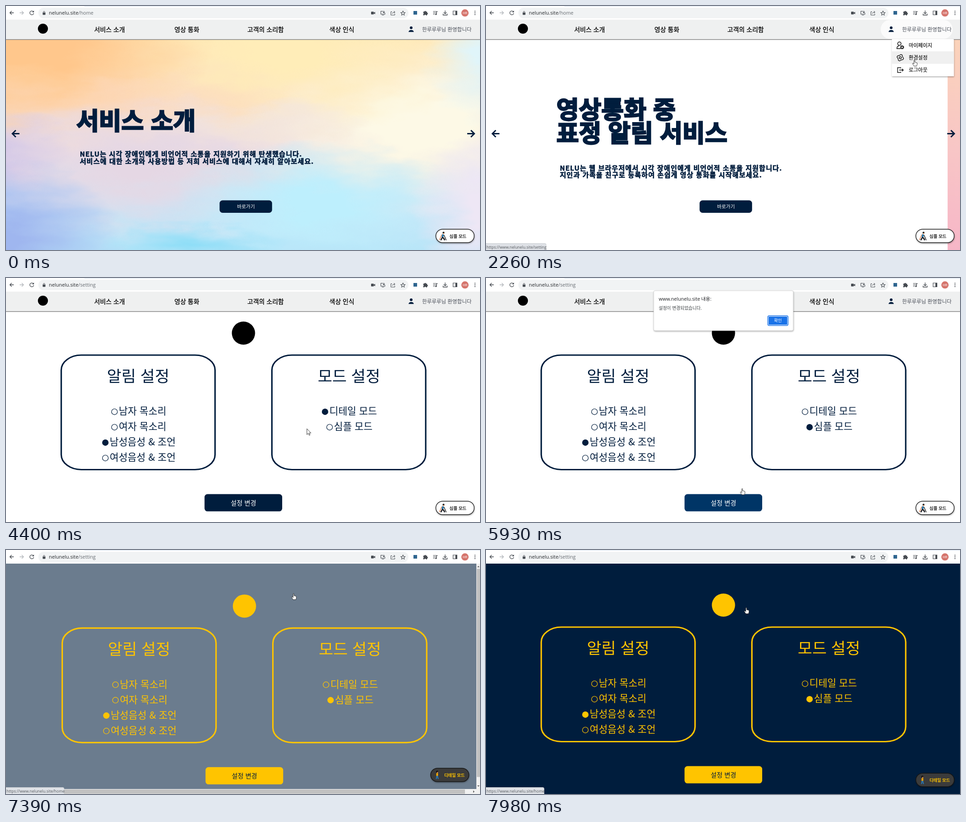
An HTML page that plays this animation: 1040 px wide and 538 px high, repeating every 8000 ms.

```html
<!DOCTYPE html>
<html lang="ko">
<head>
<meta charset="utf-8">
<title>Settings demo</title>
<style>
html, body { margin: 0; width: 100%; height: 100%; overflow: hidden; background: #fff; }
#stage { position: absolute; left: 0; top: 0; width: 1040px; height: 538px; overflow: hidden; background: #fff; }
#stage > svg { position: absolute; left: 0; top: 0; font-family: "Noto Sans CJK KR", "Noto Sans CJK", sans-serif; }
svg text { white-space: pre; }
.ui { font-family: "Open Sans", "Noto Sans", sans-serif; }
.airy { letter-spacing: 1.05px; }
.slide { position: absolute; left: 0; top: 74px; width: 1040px; height: 464px; overflow: hidden; }
.paint {
  position: absolute; inset: -50px; filter: url(#brush);
  background:
    radial-gradient(ellipse 140px 170px at 1110px 80px, #e0f5fa 20%, #e0f5fa00),
    radial-gradient(ellipse 150px 170px at 1090px 420px, #eee7f5 20%, #eee7f500),
    radial-gradient(ellipse 210px 60px at 460px 510px, #8fdef7, #8fdef700),
    radial-gradient(ellipse 330px 140px at 740px 410px, #bdeffd 20%, #bdeffd00),
    radial-gradient(ellipse 300px 60px at 410px 180px, #fcdabc60 50%, #fcdabc00 95%),
    radial-gradient(ellipse 300px 60px at 580px 235px, #f2e5de90 45%, #f2e5de00 95%),
    radial-gradient(ellipse 270px 180px at 40px 490px, #9fb6ef 15%, #9fb6ef00),
    radial-gradient(ellipse 170px 110px at 20px 300px, #d0c4e8, #d0c4e800),
    radial-gradient(ellipse 420px 150px at 340px 330px, #e5d7e4 10%, #e5d7e400),
    radial-gradient(ellipse 400px 200px at 110px 60px, #ffc78c 22%, #ffc78c00),
    radial-gradient(ellipse 420px 200px at 660px 70px, #ffedb8 15%, #ffedb800),
    radial-gradient(ellipse 430px 210px at 960px 230px, #fdf9e6 25%, #fdf9e600),
    linear-gradient(#ffe6b6 8%, #fbdcc6 32%, #eedfe2 52%, #d3e4f4 70%, #b9e5f8 90%);
}
.rose { background: linear-gradient(176deg, #fbd3ba, #f8c6c6 45%, #f6b1c8); }
</style>
</head>
<body>
<div id="stage">
  <div class="slide" id="first"><div class="paint"></div></div>
  <div class="slide rose" id="second"></div>
  <svg id="view" width="1040" height="538" viewBox="0 0 1040 538"></svg>
</div>
<script>
const LOOP = 8000, NAVY = '#001d3d', GOLD = '#ffc400';
const HOST = 'nelunelu.site';

// Text placed by its visual middle; "thick" outlines it for extra weight
function text(x, mid, size, str, o = {}) {
  const { weight = 400, fill = 'currentColor', anchor = 'start', cls = '', thick = 0, extra = '' } = o;
  return `<text class="${cls}" x="${x}" y="${(mid + size * .37).toFixed(2)}" font-size="${size}"
    font-weight="${weight}" fill="${fill}" text-anchor="${anchor}"
    ${thick ? `stroke="${fill}" stroke-width="${thick}"` : ''} ${extra}>${str}</text>`;
}
const rect = (x, y, w, h, r, fill, extra = '') =>
  `<rect x="${x}" y="${y}" width="${w}" height="${h}" rx="${r}" fill="${fill}" ${extra}/>`;
const dot = (x, y, r, fill, extra = '') =>
  `<circle cx="${x}" cy="${y}" r="${r}" fill="${fill}" ${extra}/>`;
const line = (d, color, width = 1.3, extra = '') =>
  `<path d="${d}" fill="none" stroke="${color}" stroke-width="${width}" ${extra}/>`;
const solid = (d, fill, extra = '') => `<path d="${d}" fill="${fill}" ${extra}/>`;
const group = (id, body, extra = '') => `<g id="${id}" ${extra}>${body}</g>`;

function browserBar() {
  const g = '#454a50';
  return rect(0, 0, 1040, 30, 0, '#fff') + rect(172, 0, 868, 1, 0, '#d7e3f0') +
    rect(71, 4, 812, 23, 11.5, '#f1f3f4') +
    line('M17 15H9M12.5 11L8.5 15L12.5 19', g) +
    line('M30 15H38M34.5 11L38.5 15L34.5 19', '#b4b8bc') +
    line('M60 12.5A4.3 4.3 0 1 0 60.8 16', g) + solid('M61.3 10V14H57.3Z', g) +
    rect(80.5, 14.5, 6, 5, .8, g) + line('M81.8 15V13.4A1.7 1.7 0 0 1 85.2 13.4V15', g, 1) +
    `<text class="ui" x="94" y="19.2" font-size="10.8" fill="#25282c">${HOST}<tspan id="path" fill="#676c72"></tspan></text>` +
    rect(801, 12.5, 6, 6, .8, g) + solid('M807 15L810 12.8V18.2L807 16Z', g) +
    line('M827 11.5H822.5V18H831.5V15.5M824.5 20H829.5M829 10.5V15M826.8 13L829 15.2L831.2 13', g, 1.1) +
    line('M847 12.5H844.5V20H853V17M847 17Q848 13.5 853 13.5M851 11L853.6 13.5L851 16', g, 1) +
    line('M871 11L872.4 14.2L875.8 14.5L873.2 16.8L874 20.2L871 18.4L868 20.2L868.8 16.8L866.2 14.5L869.6 14.2Z', g, 1.1) +
    rect(894, 11, 8, 8, 0, '#2f6690') +
    solid('M915.5 12.5H918A1.7 1.7 0 0 1 921.4 12.5H924V15A1.7 1.7 0 0 1 924 18.4V20.5H921.2A1.5 1.5 0 0 0 918.2 20.5H915.5V17.8A1.5 1.5 0 0 0 915.5 15Z', g) +
    line('M937 12H945M937 15H945M937 18H941M944.6 18V12.4H947', g, 1.2) + dot(943.4, 18.3, 1.6, g) +
    line('M963.5 10V17M960.3 14L963.5 17.2L966.7 14M959 17V20H968V17', g) +
    line('M981 11H989.5V19.5H981Z', g, 1.2) + rect(986, 11, 3.5, 8.5, 0, g) +
    dot(1007, 15.3, 8, '#d5746c') +
    text(1007, 15.5, 7.5, 'HR', { fill: '#fff', anchor: 'middle', cls: 'ui' }) +
    [11.5, 15.2, 18.9].map(y => dot(1029, y, 1.1, g)).join('');
}

function navBar() {
  const items = [[194, '서비스 소개'], [370, '영상 통화'], [530, '고객의 소리함'], [710, '색상 인식']];
  return rect(0, 30, 1040, 43.5, 0, '#eff0f0') + rect(0, 73.2, 1040, 1.5, 0, '#858585') +
    dot(81, 50, 11, '#000') +
    items.map(([x, s]) => text(x - .5, 51.5, 13.8, s, { weight: 500, fill: '#000', thick: .3 })).join('') +
    group('hover', rect(866, 30.5, 158, 42, 21, '#fbfbfb')) +
    dot(889, 48, 3, NAVY) + solid('M883.3 57.3C883.3 51.4 894.7 51.4 894.7 57.3Z', NAVY) +
    text(913, 51.5, 11.45, '한루루루님 환영합니다', { fill: '#4a4f59', weight: 300 });
}

function menu() {
  const k = '#111', item = { weight: 500, fill: k, thick: .2 };
  const gear = Array.from({ length: 16 }, (_, i) => {
    const r = i % 4 < 2 ? 7.3 : 5.6, a = (i + .5) * Math.PI / 8;
    return `${(909 + r * Math.cos(a)).toFixed(1)} ${(114 + r * Math.sin(a)).toFixed(1)}`;
  }).join('L');
  return rect(890.5, 73, 136, 82, 1, '#fff', 'filter="url(#soft)"') +
    rect(890.5, 100, 136, 27.5, 0, '#f0f0f0', 'id="row"') +
    dot(907, 83, 3.7, 'none', `stroke="${k}" stroke-width="1.5"`) +
    line('M910 94H901.5C901.5 90 902.5 88.3 906 88', k, 1.5) +
    dot(913, 91, 2.6, 'none', `stroke="${k}" stroke-width="1.7"`) +
    dot(913, 91, 3.8, 'none', `stroke="${k}" stroke-width="1.2" stroke-dasharray="1.5 1.48"`) +
    line(`M${gear}Z`, k, 1.4, 'stroke-linejoin="round"') + dot(909, 114, 2.4, 'none', `stroke="${k}" stroke-width="1.4"`) +
    line('M910 137.5V136H903V146.5H910V145M906.5 141.2H915.5M912.8 138.4L915.6 141.2L912.8 144', k, 1.4) +
    text(927.5, 87, 11.2, '마이페이지', item) +
    text(927.5, 114, 11.2, '환경설정', item) + text(927.5, 141, 11.2, '로그아웃', item);
}

function homePage() {
  const heavy = { weight: 900, fill: NAVY };
  const title = (y, s) => text(154.5, y, 53.6, s, { ...heavy, thick: 2.8 });
  const row = (y, s) => text(162, y, 15, s, { ...heavy, thick: .6, cls: 'airy' });
  const para = (y, a, b) => row(y, a) + row(y + 15.5, b);
  return group('copy1', title(253.5, '서비스 소개') +
      para(326.5, 'NELU는 시각 장애인에게 비언어적 소통을 지원하기 위해 탄생했습니다.',
        '서비스에 대한 소개와 사용방법 등 저희 서비스에 대해서 자세히 알아보세요.')) +
    group('copy2', title(228.5, '영상통화 중') + title(280.5, '표정 알림 서비스') +
      para(357, 'NELU는 웹 브라우저에서 시각 장애인에게 비언어적 소통을 지원합니다.',
        '지인과 가족을 친구로 등록하여 손쉽게 영상 통화를 시작해보세요.')) +
    line('M29.5 281.5H14M21.5 274L14 281.5L21.5 289', NAVY, 3) +
    line('M1012 281.5H1027.5M1020 274L1027.5 281.5L1020 289', NAVY, 3) +
    rect(468.6, 428.6, 115.2, 27.4, 6.5, NAVY) +
    text(526.5, 442.5, 10.6, '바로가기', { fill: '#fff', anchor: 'middle' });
}

const radios = [
  [238, 293.5, '남자 목소리'], [238, 327.5, '여자 목소리'], [218, 361.5, '남성음성 &amp; 조언'],
  [218, 395.5, '여성음성 &amp; 조언'], [700, 293.5, '디테일 모드'], [710, 327.5, '심플 모드']
];

function settingsPage() {
  const card = x => `<rect x="${x}" y="170" width="337.5" height="252.5" rx="44" ry="33"
    fill="none" stroke="currentColor" stroke-width="3.2"/>`;
  return dot(521, 121.5, 25.5, 'currentColor', 'id="mark"') + card(121.2) + card(583.4) +
    text(290, 216, 34.6, '알림 설정', { anchor: 'middle', weight: 300 }) +
    text(752.5, 216, 34.6, '모드 설정', { anchor: 'middle', weight: 300 }) +
    radios.map(([x, y, s]) => dot(x, y + 1.4, 6.4, 'none', 'class="radio" stroke="currentColor" stroke-width="1.2"') +
      text(x + 9.5, y, 21.4, s, { weight: 300 })).join('') +
    rect(435.6, 476.6, 170.4, 38, 6.5, NAVY, 'id="save"') +
    text(521, 496, 14.1, '설정 변경', { anchor: 'middle', fill: '#fff', extra: 'id="saveText"' });
}

function modeButton() {
  const walker = (top, leg) => dot(960, 500, 2.2, '#111') + dot(960.6, 501.6, 1.4, '#e9a06b') +
    line('M959 503.5L957.5 510', top, 4) +
    line('M957.5 510L954 516.5M958 510L961 513L962.5 516.5', leg, 2.6);
  return rect(943.2, 492.2, 84, 29.6, 14.8, '#fff', 'id="modeBox" stroke-width="1.4" filter="url(#soft)"') +
    group('simple', walker('#2473a6', '#15171c') + line('M961 505L966 516.5', '#111', 1.4) + line('M956 504L951 516', '#d9743f', 1.3) +
      text(973, 507.3, 9.4, '심플 모드', { weight: 500, fill: '#111', thick: .25 })) +
    group('detail', dot(957.5, 500, 2.2, '#000') + dot(958.2, 501.5, 1.4, '#d58a55') +
      line('M957.5 503V509.5', '#e8a200', 4) + line('M957 509L955.5 516M958 509L960 516', '#2878b8', 2) +
      text(973, 507.3, 9.2, '디테일 모드', { weight: 700, fill: GOLD }));
}

function scrollBars() {
  const a = '#606060', t = '#c1c1c1';
  return rect(1032, 30, 8, 508, 0, '#f1f1f1') + rect(0, 527, 1040, 11, 0, '#f1f1f1') +
    rect(1033, 41.5, 7, 459, 0, t) + rect(10, 528, 997, 9.5, 0, t) +
    solid('M1034 38L1036.5 35L1039 38Z', a) + solid('M1034 519L1036.5 522L1039 519Z', a) +
    solid('M6 530L3 532.7L6 535.4Z', a) + solid('M1025 530L1028 532.7L1025 535.4Z', a);
}

function dialog() {
  return rect(368, 28, 306, 88, 3, '#fff', 'filter="url(#soft)" stroke="#c9c9c9" stroke-width=".8"') +
    text(379, 46.5, 10.6, `www.${HOST} 내용:`, { fill: '#202124', cls: 'ui' }) +
    text(379, 66, 9.7, '설정이 변경되었습니다.', { fill: '#3c4043' }) +
    rect(618.3, 83.3, 44.4, 21.4, 3, '#fff', 'stroke="#1a73e8" stroke-width="1.5"') +
    rect(620, 85, 41, 18, 1.5, '#1a73e8') +
    text(640.5, 94, 9.3, '확인', { fill: '#fff', anchor: 'middle' });
}

const status = group('status', rect(-4, 523.5, 132, 18, 3, '#dee1e6', 'id="statusBox" stroke="#c6c9cd" stroke-width=".8"') +
  text(1, 531.5, 8.5, '', { fill: '#54585d', cls: 'ui', extra: 'id="statusText"' }));

const pointer = group('cursor',
  solid('M-1 1C-1-.4 1-.4 1 1V5C1.6 4.4 2.8 4.7 2.8 5.5C3.4 5 4.4 5.2 4.4 6C5 5.6 6 5.9 6 6.8V9.5C6 11 5 11.6 5 13.5H-1.2C-1.2 12-4 9.6-4.2 8C-4.3 7-2.8 6.8-1.9 8L-1 9Z',
    '#fff', 'id="hand" stroke="#222" stroke-width=".9"') +
  solid('M0 0V13L3 10.2L5 14.6L7 13.7L5 9.5H9Z', '#fff', 'id="arrow" stroke="#222" stroke-width=".9"'));

document.getElementById('view').innerHTML = `<defs>
  <filter id="soft" x="-20%" y="-20%" width="140%" height="150%">
    <feDropShadow dx=".5" dy="1.5" stdDeviation="1.6" flood-color="#000" flood-opacity=".35"/></filter>
  <filter id="brush" x="0" y="0" width="100%" height="100%" color-interpolation-filters="sRGB">
    <feTurbulence type="fractalNoise" baseFrequency=".008 .024" numOctaves="4" seed="7"/>
    <feDisplacementMap in="SourceGraphic" scale="75" xChannelSelector="R" yChannelSelector="G"/></filter>
  </defs>` +
  group('home', homePage()) +
  group('settings', rect(0, 30, 1040, 508, 0, '#fff', 'id="paper"') + group('content', settingsPage())) +
  group('nav', navBar()) + group('menu', menu()) + group('mode', modeButton()) +
  group('bars', scrollBars()) + browserBar() + status + group('dialog', dialog()) + pointer;

const el = {};
document.querySelectorAll('[id]').forEach(e => el[e.id] = e);
const radioEls = [...document.querySelectorAll('.radio')];
const set = (id, name, value) => el[id].setAttribute(name, value);
const show = (id, on) => { el[id].style.display = on ? '' : 'none'; };
const clamp = v => Math.min(1, Math.max(0, v));
const between = (t, a, b) => t >= a && t < b;

// Linear interpolation over rows of [time, ...values]
function track(rows, t) {
  const i = rows.findIndex(r => r[0] > t);
  if (i < 0) return rows[rows.length - 1].slice(1);
  if (i === 0) return rows[0].slice(1);
  const a = rows[i - 1], b = rows[i], p = (t - a[0]) / (b[0] - a[0]);
  return a.slice(1).map((v, k) => v + (b[k + 1] - v) * p);
}

// The CSS "ease" curve
function ease(p) {
  if (p <= 0 || p >= 1) return clamp(p);
  let lo = 0, hi = 1;
  for (let i = 0; i < 20; i++) {
    const s = (lo + hi) / 2, x = .75 * s * (1 - s) + s ** 3;
    if (x < p) lo = s; else hi = s;
  }
  return .3 * lo * (1 - lo) ** 2 + 3 * lo * lo * (1 - lo) + lo ** 3;
}

const cursorPath = [
  [330, 1008, 2], [520, 803, 14], [660, 814, 22], [790, 915, 66], [990, 914, 48], [1060, 915, 45],
  [1650, 915, 54], [1920, 940, 119], [2400, 940, 119], [2790, 915, 151], [3000, 915, 151],
  [3240, 600, 300], [3540, 218, 362], [3740, 218, 362], [4180, 520, 350], [4530, 742, 322],
  [4660, 737, 324], [4800, 737, 324], [5200, 533, 481], [5530, 531, 480], [5730, 533, 480],
  [5930, 562, 465], [6250, 610, 270], [6600, 638, 100], [7180, 634, 93], [7260, 633, 94],
  [7390, 631, 96], [7520, 626, 100], [7980, 571, 127]
];
const arrowSpans = [[330, 900], [3060, 3480], [3800, 4480], [4860, 5180], [6000, 7190]];
const hoverFade = [[720, 0], [850, 1], [2700, 1], [2790, .35], [3000, .35], [3010, 0]];
const SLIDE = 1930, ENTER = 2252, OPEN = 2460, ALERT = 5730, THEME = 7186;

function render(t) {
  const home = t < OPEN, dark = t >= THEME;
  const fade = ease(clamp((t - THEME) / 610));

  const out = ease(clamp((t - SLIDE) / 310));
  show('first', home && out < 1);
  el.first.style.transform = `translateX(${-1040 * out}px)`;
  el.first.style.opacity = 1 - .6 * out;
  const w = 17.3 * Math.max(0, t - ENTER) / 1000;
  show('second', home && t >= ENTER);
  el.second.style.transform = `translateX(${1024 * (1 + w) * Math.exp(-w)}px)`;

  show('home', home);
  show('copy1', t < SLIDE);
  show('copy2', t >= SLIDE);
  show('menu', between(t, 1260, OPEN));
  show('row', t >= 1850);
  el.path.textContent = home ? '/home' : '/setting';

  show('settings', !home);
  show('nav', !dark);
  set('hover', 'opacity', track(hoverFade, t)[0]);
  const tint = [0, 29, 61].map(c => Math.round(255 + (c - 255) * fade));
  set('paper', 'fill', `rgb(${tint})`);
  const shift = dark ? 5.2 * (1 - fade) : 0;
  set('content', 'transform', `translate(${shift} ${shift})`);
  set('content', 'color', dark ? GOLD : NAVY);
  set('mark', 'fill', dark ? GOLD : '#000');
  set('save', 'fill', dark ? GOLD : t >= 5160 ? '#003566' : NAVY);
  set('saveText', 'fill', dark ? NAVY : '#fff');
  const picked = [t < 3740 ? 3 : 2, t < 4800 ? 4 : 5];
  radioEls.forEach((r, i) => r.setAttribute('fill', picked.includes(i) ? 'currentColor' : 'none'));

  const bars = dark && fade < 1;
  show('bars', bars);
  set('mode', 'transform', bars ? 'translate(-11.5 -11)' : '');
  set('modeBox', 'fill', dark ? '#3b3b3b' : '#fff');
  set('modeBox', 'stroke', dark ? '#161616' : '#222');
  show('simple', !dark);
  show('detail', dark);

  const toSetting = between(t, 1900, 2700);
  show('status', toSetting || between(t, 2700, 3100) || t >= 7210);
  set('status', 'opacity', t >= 7210 ? clamp((t - 7210) / 125) : 1);
  set('statusBox', 'width', toSetting ? 136 : 131.5);
  el.statusText.textContent = `https://www.${HOST}` + (toSetting ? '/setting' : '/home');

  const come = clamp((t - ALERT) / 160), leave = clamp((t - THEME) / 92);
  show('dialog', t >= ALERT && leave < 1);
  set('dialog', 'opacity', come * (1 - leave));
  set('dialog', 'transform', `translate(0 ${-11 * (1 - come) - 13.5 * leave})`);

  const [x, y] = track(cursorPath, t);
  const arrow = arrowSpans.some(([a, b]) => between(t, a, b));
  show('cursor', t >= 330);
  show('arrow', arrow);
  show('hand', !arrow);
  set('cursor', 'transform', `translate(${x} ${y})`);
}

const start = performance.now();
function tick() {
  render((performance.now() - start) % LOOP);
  requestAnimationFrame(tick);
}
tick();
</script>
</body>
</html>
```
